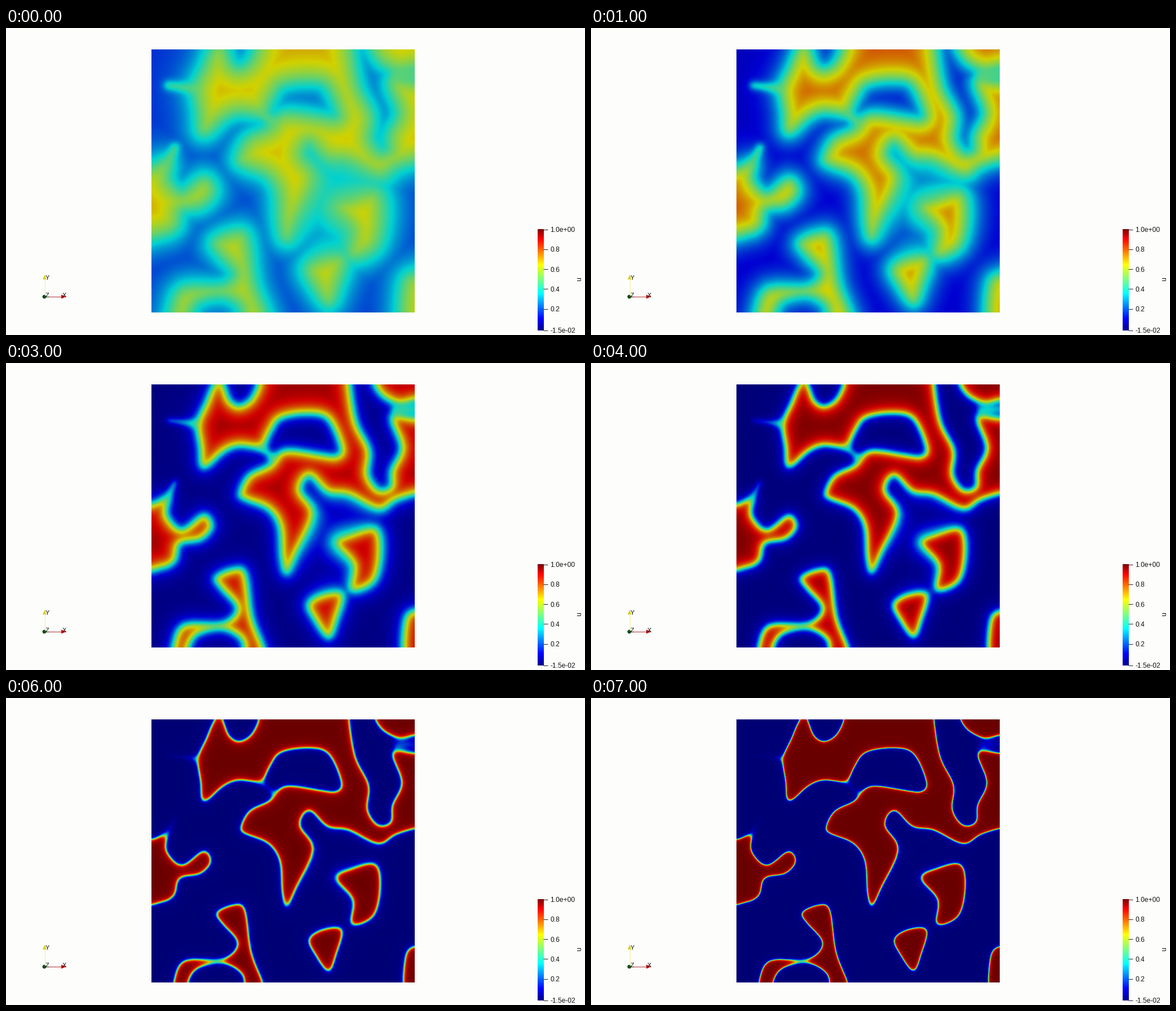
Recreate the animation shown at these times as a matplotlib script. Size 1027x545 px, loop 8000 ms.

```python
import numpy as np
import matplotlib.pyplot as plt
from matplotlib.animation import FuncAnimation
from matplotlib.colors import LinearSegmentedColormap
from matplotlib.patches import Circle, Polygon
from matplotlib.path import Path

W, H, DPI = 1027, 545, 128
LEFT, RIGHT, TOP, BOTTOM = 258, 725, 38, 505
SHADE = 0.82
GROWTH = 0.54

# Key points of the closed outlines around the high phase, in stage pixels.
CONTINENT = [(448, 39), (434, 66), (413, 77), (396, 67), (387, 45), (380, 32),
             (368, 42), (355, 72), (340, 108), (345, 150), (347, 180), (358, 181),
             (385, 157), (412, 146), (452, 148), (468, 122), (487, 97), (535, 89),
             (572, 99), (595, 150), (586, 166), (560, 164), (510, 156), (487, 160),
             (468, 182), (432, 200), (416, 230), (424, 241), (465, 258), (486, 290),
             (490, 345), (498, 371), (515, 336), (545, 268), (521, 226), (538, 199),
             (570, 228), (608, 234), (660, 259), (690, 243), (725, 232), (760, 225),
             (760, 98), (725, 98), (685, 97), (702, 150), (685, 190), (683, 220),
             (660, 226), (641, 198), (644, 155), (620, 105), (609, 39), (608, 10),
             (452, 10)]
CORNER = [(659, 20), (663, 52), (695, 71), (725, 66), (760, 60), (760, 20)]
WEST_ISLE = [(230, 251), (258, 251), (284, 243), (285, 272), (312, 297), (350, 271),
             (364, 290), (345, 312), (308, 320), (299, 350), (275, 363), (230, 362)]
EAST_ISLE = [(586, 320), (612, 304), (655, 295), (664, 335), (652, 387), (613, 402),
             (616, 358)]
WEDGE = [(537, 428), (562, 411), (596, 411), (586, 455), (572, 486), (548, 455)]
HOOK = [(373, 381), (403, 367), (424, 375), (435, 450), (456, 505), (460, 530),
        (425, 530), (420, 492), (385, 471), (340, 480), (323, 505), (322, 530),
        (296, 530), (297, 505), (316, 466), (385, 463), (411, 435), (383, 400)]
SLIVER = [(709, 530), (708, 460), (725, 440), (760, 440), (760, 530)]
SHAPES = [CONTINENT, CORNER, WEST_ISLE, EAST_ISLE, WEDGE, HOOK, SLIVER]

# Faint strands that linger in the low phase: start and end.
STRANDS = [((288, 102), (338, 108)), ((285, 243), (300, 212)),
           ((452, 150), (478, 172)), ((690, 84), (725, 82))]

X, Y = np.meshgrid(np.arange(LEFT, RIGHT) + 0.5, np.arange(TOP, BOTTOM) + 0.5)
X, Y = X.astype(np.float32), Y.astype(np.float32)


def smooth_outline(points, steps=4):
    """Closed Catmull-Rom curve through the key points."""
    p1 = np.array(points, float)
    p0, p2, p3 = (np.roll(p1, k, axis=0) for k in (1, -1, -2))
    t = (np.arange(steps) / steps)[None, :, None]
    p0, p1, p2, p3 = (p[:, None] for p in (p0, p1, p2, p3))
    curve = p1 + 0.5 * t * (p2 - p0 + t * (2 * p0 - 5 * p1 + 4 * p2 - p3
                                           + t * (3 * (p1 - p2) + p3 - p0)))
    return curve.reshape(-1, 2)


def segment_dist2(a, b):
    (ax_, ay), (bx, by) = map(lambda p: map(float, p), (a, b))
    dx, dy = bx - ax_, by - ay
    rx, ry = X - ax_, Y - ay
    t = np.clip((rx * dx + ry * dy) / (dx * dx + dy * dy), 0, 1)
    return (rx - t * dx) ** 2 + (ry - t * dy) ** 2


def signed_distance():
    """Distance to the nearest outline, positive in the high phase."""
    inside = np.zeros(X.shape, bool)
    dist2 = np.full(X.shape, 1e6, np.float32)
    pixels = np.column_stack([X.ravel(), Y.ravel()])
    for shape in SHAPES:
        curve = smooth_outline(shape)
        inside |= Path(curve).contains_points(pixels).reshape(X.shape)
        for a, b in zip(curve, np.roll(curve, -1, axis=0)):
            mx, my = (a + b) / 2
            if LEFT - 8 < mx < RIGHT + 8 and TOP - 8 < my < BOTTOM + 8:
                dist2 = np.minimum(dist2, segment_dist2(a, b))
    return np.where(inside, 1, -1) * np.sqrt(dist2)


def blur(field, sigma):
    reach = int(3 * sigma)
    kernel = np.exp(-0.5 * (np.arange(-reach, reach + 1) / sigma) ** 2)
    kernel /= kernel.sum()
    for axis in (0, 1):
        pad = [(reach, reach) if k == axis else (0, 0) for k in (0, 1)]
        wide = np.pad(field, pad, mode="edge")
        field = sum(k * np.take(wide, range(i, i + field.shape[axis]), axis)
                    for i, k in enumerate(kernel))
    return field


def starting_field():
    d = signed_distance()
    high = 0.5 * np.tanh(d / 40)
    low = 0.9 * np.tanh(d / 50)
    # The low phase starts weaker in a broad zone right of the centre.
    low *= 1 - 0.6 * np.exp(-((X - 590) ** 2 + (Y - 310) ** 2) / 100 ** 2)
    for a, b in STRANDS:
        low *= 1 - 0.9 * np.exp(-segment_dist2(a, b) / 9 ** 2)
    return blur(np.where(d > 0, high, low), 4)


W0 = starting_field()


def field_at(t):
    """Bistable growth: u' = k u (1 - u)(u - 1/2), solved in closed form."""
    w = W0 * np.exp(GROWTH * t)
    return 0.5 + 0.5 * w / np.sqrt(1 + w * w)


STOPS = [(0, (0, 0, .5625)), (.1111, (0, 0, 1)), (.3651, (0, 1, 1)),
         (.5079, (.5, 1, .5)), (.6508, (1, 1, 0)), (.9048, (1, 0, 0)), (1, (.5, 0, 0))]


def rainbow(name, shade=1.0):
    stops = [(p, tuple(shade * c for c in rgb)) for p, rgb in STOPS]
    return LinearSegmentedColormap.from_list(name, stops, N=512)


fig = plt.figure(figsize=(W / DPI, H / DPI), dpi=DPI, facecolor="#fdfdfc")
ax = fig.add_axes([0, 0, 1, 1])
ax.axis("off")


def label(x, y, text, size=12, **kw):
    ax.text(x, y, text, fontsize=size * 72 / DPI, family="Liberation Sans",
            color="#111111", va="center_baseline", **kw)


def line(xs, ys, color):
    ax.plot(xs, ys, color=color, lw=72 / DPI, solid_capstyle="butt")


image = ax.imshow(field_at(0), cmap=rainbow("shaded", SHADE), vmin=0, vmax=1,
                  extent=(LEFT, RIGHT, BOTTOM, TOP), interpolation="nearest")

# Colour bar
BAR_TOP, BAR_BOTTOM, BAR_MIN = 357.5, 536.5, -0.015
ax.imshow(np.linspace(1, 0, 180)[:, None], cmap=rainbow("bar"), vmin=0, vmax=1,
          extent=(943, 954, 537, 357), interpolation="nearest")
for value in (1, 0.8, 0.6, 0.4, 0.2, BAR_MIN):
    y = BAR_TOP + (BAR_BOTTOM - BAR_TOP) * (1 - value) / (1 - BAR_MIN)
    line([953, 961], [y, y], "#222222")
    label(965, y, f"{value:.1e}" if value in (1, BAR_MIN) else f"{value}")
label(1017, 447, "u", rotation=90, ha="center")

# Orientation axes
line([68.5, 68.5], [475, 446], "#f2ee9a")
line([68, 99], [476.5, 476.5], "#b03030")
ax.add_patch(Polygon([(68.5, 438), (65, 446.5), (72, 446.5)], color="#d8d020", lw=0))
ax.add_patch(Polygon([(107, 477), (98, 473.5), (98, 480.5)], color="#c01010", lw=0))
ax.add_patch(Circle((68, 477), 3.4, color="#004d10", lw=0))
for x, y, name in ((73, 443, "Y"), (103.5, 474, "X"), (73.5, 473.5, "Z")):
    label(x, y, name, 11, ha="center")

ax.set_xlim(0, W)
ax.set_ylim(H, 0)
ax.set_aspect("auto")


def update(step):
    image.set_data(field_at(step))
    return [image]


anim = FuncAnimation(fig, update, frames=8, interval=1000, repeat=True, repeat_delay=0)
plt.show()
```
